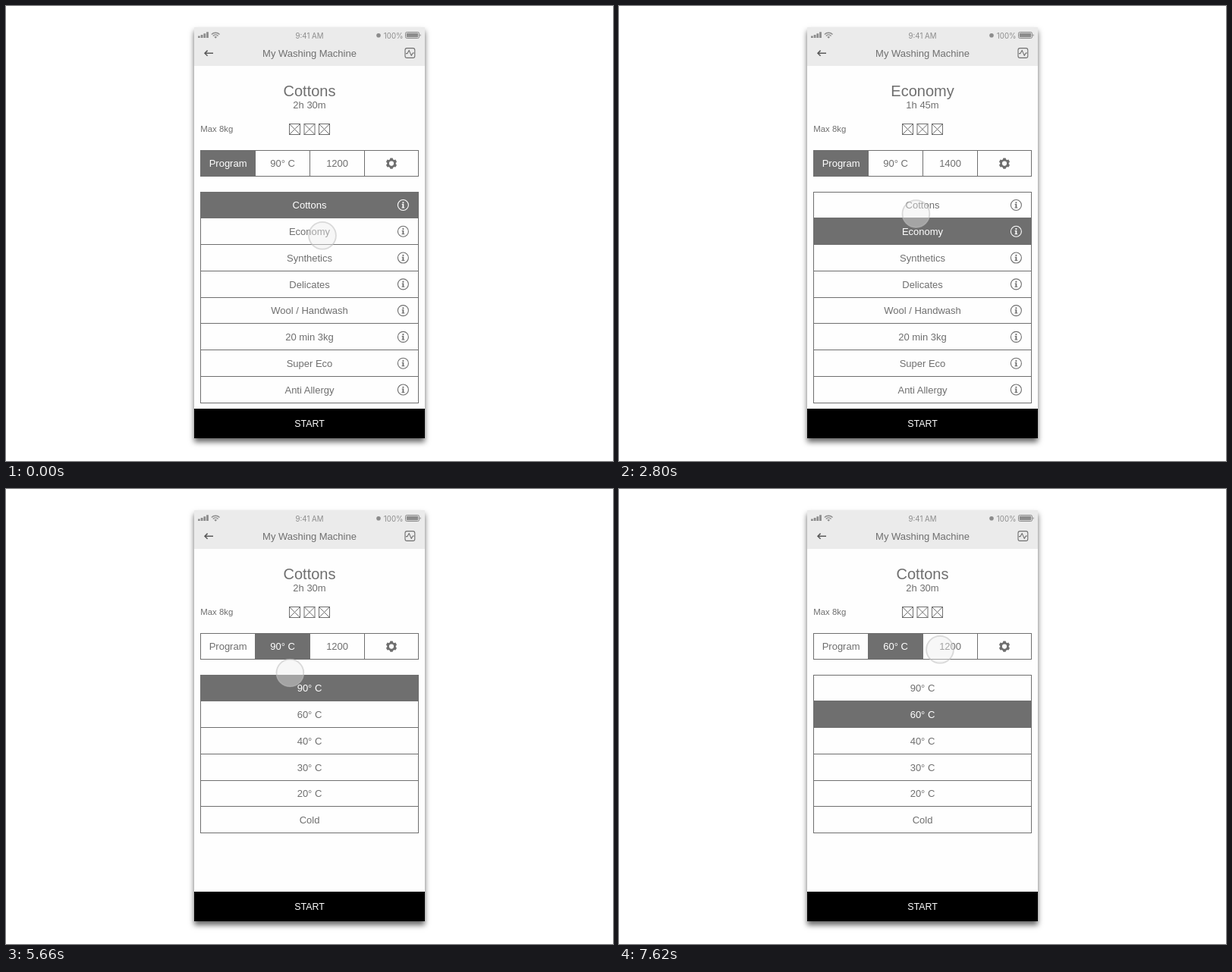
Animation of 800 by 600 pixels, one loop 8000 ms. Source, as an HTML page:

```html
<!DOCTYPE html>
<html lang="en">
<head>
<meta charset="utf-8">
<title>Washing machine app</title>
<style>
  html, body { margin: 0; width: 100%; height: 100%; overflow: hidden; background: #fff; }
  .phone {
    position: absolute; left: 248px; top: 28px; width: 304px; height: 542px;
    background: #fefefe; box-shadow: 0 5px 7px rgba(0, 0, 0, .6);
  }
  svg { position: absolute; left: 0; top: 0; display: block; }
  text { font-family: "Liberation Sans", Arial, sans-serif; font-size: 13px; fill: #6f6f6f; text-anchor: middle; }
  .status { font-family: Inter, sans-serif; font-size: 9.7px; fill: #8c8c8c; }
  .line { fill: none; stroke: #6f6f6f; stroke-width: 1; }
</style>
</head>
<body>
<div class="phone"></div>
<svg width="800" height="600" viewBox="0 0 800 600">
  <rect x="248" y="28" width="304" height="51" fill="#ebebeb"/>

  <g fill="#8c8c8c">
    <path d="M253 39.5h2.8v2.5h-2.8zM256.7 38h2.8v4h-2.8zM260.4 36.2h2.8v5.8h-2.8zM264.1 34.3h2.8v7.7h-2.8z"/>
    <path d="M276.2 42.8l-1.9-2.1a2.9 2.9 0 0 1 3.8 0z"/>
    <g fill="none" stroke="#8c8c8c" stroke-width="1.4">
      <path d="M270.9 37.4a7.6 7.6 0 0 1 10.6 0M272.8 39.4a4.9 4.9 0 0 1 6.8 0"/>
    </g>
    <circle cx="491" cy="38.7" r="2.8"/>
    <rect x="526.5" y="34.5" width="18" height="8" rx="1.8" fill="none" stroke="#8c8c8c"/>
    <rect x="527.8" y="35.8" width="15.4" height="5.4" rx=".7"/>
    <path d="M545.6 37a1.7 1.7 0 0 1 0 3.2z"/>
  </g>
  <text class="status" x="400" y="42.6">9:41 AM</text>
  <text class="status" x="510.7" y="42.6">100%</text>

  <path d="M273 62.2H262M265.6 58.6L262 62.2L265.6 65.8" fill="none" stroke="#5a5a5a" stroke-width="1.5"/>
  <text x="400" y="66.7">My Washing Machine</text>
  <g fill="none" stroke="#6f6f6f" stroke-width="1.1">
    <rect x="526" y="55.6" width="12.8" height="12.8" rx="2.4"/>
    <path d="M527 62.6h2l2.2-4.2l3 7l2-3.4h1.8" stroke-linejoin="round"/>
  </g>

  <text x="256.3" y="166.2" style="font-size:11.4px;text-anchor:start">Max 8kg</text>
  <g id="view"></g>
  <rect x="248" y="531" width="304" height="39" fill="#000"/>
  <text x="400" y="555" style="font-size:12.4px;fill:#fff">START</text>

  <g id="touch">
    <circle id="disc" r="18.5"/>
    <circle r="17.9" fill="none" stroke="#b4b4b4" stroke-opacity=".45" stroke-width="1.8"/>
  </g>
</svg>
<script>
const LOOP = 8000, GREY = '#6f6f6f', LIGHT = '#fff';
const byId = id => document.getElementById(id);
const view = byId('view'), touch = byId('touch'), disc = byId('disc');

const programs = ['Cottons', 'Economy', 'Synthetics', 'Delicates', 'Wool / Handwash',
  '20 min 3kg', 'Super Eco', 'Anti Allergy'];
const temps = ['90° C', '60° C', '40° C', '30° C', '20° C', 'Cold'];

const cottons = { title: 'Cottons', time: '2h 30m', temp: 0, spin: 1200, tab: 0, sel: 0 };
const economy = { ...cottons, title: 'Economy', time: '1h 45m', spin: 1400, sel: 1 };
const screens = [
  [0, cottons],
  [2100, economy],
  [3660, cottons],
  [5120, { ...cottons, tab: 1 }],
  [6680, { ...cottons, tab: 1, temp: 1, sel: 1 }]
];

// start, end, target x, target y
const start = [417, 302.8];
const moves = [
  [880, 1360, 387, 302.8],
  [1520, 1640, 382.8, 302.8],
  [2500, 2800, 391.4, 274],
  [4020, 4500, 366, 212],
  [5400, 6000, 387, 288.4],
  [6140, 6380, 389, 293.5],
  [7100, 7620, 423, 211.8]
];
const presses = [[1960, 2120], [3540, 3680], [4980, 5140], [6560, 6700]];

const label = (x, y, s, color = GREY, size = 13) =>
  `<text x="${x}" y="${y}" style="fill:${color};font-size:${size}px">${s}</text>`;
const box = (x, y, w, h) => `<rect class="line" x="${x}" y="${y}" width="${w}" height="${h}"/>`;
const fill = (x, y, w, h) => `<rect x="${x}" y="${y}" width="${w}" height="${h}" fill="${GREY}"/>`;
const rowY = i => Math.floor(245 + 34.78 * i);

const crossBox = x => box(x, 155.5, 14, 14) +
  `<path class="line" d="M${x} 155.5l14 14m0-14l-14 14"/>`;

const info = (y, color) => `<g transform="translate(523.4 ${y})" fill="${color}">
  <circle r="7" fill="none" stroke="${color}" stroke-width="1.1"/>
  <circle cy="-3.2" r="1.1"/>
  <path d="M-1.7-1.4H.9V3H1.9V4H-1.9V3H-.9V-.4H-1.7z"/></g>`;

function gear(x, y) {
  let s = `<g transform="translate(${x} ${y})" fill="${GREY}">
    <circle r="4.4" fill="none" stroke="${GREY}" stroke-width="2.6"/>`;
  for (let a = 0; a < 360; a += 60)
    s += `<path transform="rotate(${a})" d="M-2.4-4.6L-1.6-7.2H1.6L2.4-4.6z"/>`;
  return s + '</g>';
}

function tabs(s) {
  const names = ['Program', temps[s.temp], s.spin];
  let out = box(256.5, 190.5, 287, 34) + fill(257 + 72 * s.tab, 190, 72, 35);
  names.forEach((n, i) => {
    out += label(292.6 + 72 * i, 212.4, n, i === s.tab ? LIGHT : GREY) +
      `<path class="line" d="M${328.5 + 72 * i} 190v35"/>`;
  });
  return out + gear(508, 207.6);
}

function list(s) {
  const rows = s.tab ? temps : programs;
  let out = '';
  rows.forEach((n, i) => {
    const top = rowY(i), on = i === s.sel, color = on ? LIGHT : GREY;
    const mid = 262.5 + 34.78 * i;
    out += box(256.5, top + .5, 287, rowY(i + 1) - top);
    if (on) out += fill(256, top, 288, rowY(i + 1) - top + 1);
    out += label(400, mid + 4.8, n, color);
    if (!s.tab) out += info(mid, color);
  });
  return out;
}

function draw(s) {
  view.innerHTML = label(400, 118.8, s.title, GREY, 20) + label(400, 134.8, s.time) +
    [373.5, 393, 412.5].map(crossBox).join('') + tabs(s) + list(s);
}

function position(t) {
  let [x, y] = start;
  for (const [a, b, tx, ty] of moves) {
    const p = Math.min(1, Math.max(0, (t - a) / (b - a)));
    const k = (1 - Math.cos(Math.PI * p)) / 2;
    x += (tx - x) * k;
    y += (ty - y) * k;
  }
  return [x, y];
}

let shown;
function render(t) {
  const screen = screens.filter(([at]) => t >= at).pop()[1];
  if (screen !== shown) draw(shown = screen);
  const [x, y] = position(t);
  touch.setAttribute('transform', `translate(${x.toFixed(2)} ${y.toFixed(2)})`);
  const pressed = presses.some(([a, b]) => t >= a && t < b);
  disc.setAttribute('fill', pressed ? 'rgba(226,226,226,.6)' : 'rgba(236,236,236,.42)');
}

const t0 = performance.now();
function tick() {
  render((performance.now() - t0) % LOOP);
  requestAnimationFrame(tick);
}
tick();
</script>
</body>
</html>
```
